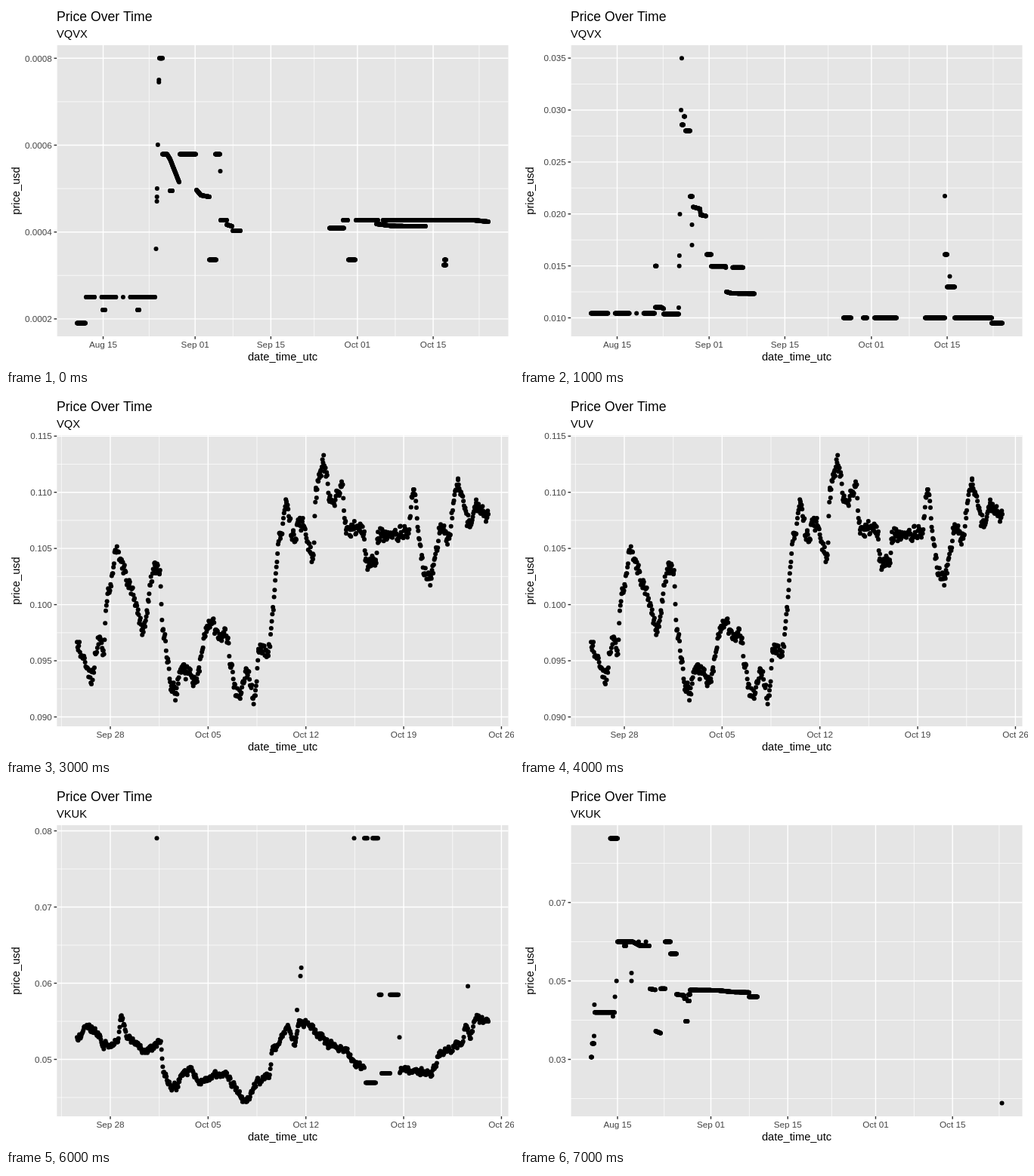
An HTML page with a canvas for the animation above (8 s loop, 672 px wide and 480 px high).

```html
<!DOCTYPE html>
<html lang="en">
<head>
<meta charset="utf-8">
<title>Price Over Time</title>
<style>
  html, body { margin: 0; width: 100%; height: 100%; overflow: hidden; background: #fff; }
  canvas { display: block; }
</style>
</head>
<body>
<canvas id="stage" width="672" height="480"></canvas>
<script>
const ctx = document.getElementById('stage').getContext('2d');
const PANEL = { left: 67.2, top: 52, right: 664.7, bottom: 438 };
const RADIUS = 3;
const FONT = '"Liberation Sans", Arial, sans-serif';

const monthAxis = (start, day) => ({
  day,
  labels: ['Aug 15', 'Sep 01', 'Sep 15', 'Oct 01', 'Oct 15'],
  at: [0, 17, 31, 47, 61].map(d => start + d * day)
});
const weekAxis = {
  day: 18.48,
  labels: ['Sep 28', 'Oct 05', 'Oct 12', 'Oct 19', 'Oct 26'],
  at: [0, 1, 2, 3, 4].map(i => 138 + i * 129.35)
};
const valueAxis = (first, step, count, digits, y, gap) => ({
  labels: Array.from({ length: count }, (_, i) => (first - i * step).toFixed(digits)),
  at: Array.from({ length: count }, (_, i) => y + i * gap)
});

let random, hour;

function seeded(seed) {
  return () => (seed = (seed * 16807) % 2147483647) / 2147483647;
}

function dot(x, y) {
  ctx.beginPath();
  ctx.arc(x, y, RADIUS, 0, Math.PI * 2);
  ctx.fill();
}

// Calls visit(x, y) once an hour along a polyline of x, y pairs.
function hourly(keys, ease, visit) {
  for (let i = 0; i + 3 < keys.length; i += 2) {
    const [x0, y0, x1, y1] = keys.slice(i, i + 4);
    const count = Math.max(1, Math.round((x1 - x0) / hour));
    for (let k = 0; k <= count; k++) {
      const t = k / count;
      visit(x0 + (x1 - x0) * t, y0 + (y1 - y0) * ease(t));
    }
  }
}

const slope = (...keys) => hourly(keys, t => t, dot);

// A constant price, with a pause of about a day now and then.
function level(y, x0, x1, pauses = 0) {
  let resume = x0;
  hourly([x0, y, x1, y], t => t, x => {
    if (x < resume) return;
    dot(x, y);
    if (random() < pauses) resume = x + hour * (22 + 10 * random());
  });
}

// A wandering price: smooth moves between keys plus correlated noise.
function walk(spread, ...keys) {
  let drift = 0;
  hourly(keys, t => t * t * (3 - 2 * t), (x, y) => {
    drift = drift * 0.45 + (random() + random() - 1) * spread;
    dot(x, y + drift);
  });
}

// Single trades during a steep rise, leaning slightly to the right.
const rise = (x, lean, ...ys) => ys.forEach(y => dot(x + (ys[0] - y) * lean, y));

const charts = [
  {
    x: monthAxis(128.5, 7.157),
    y: valueAxis(0.0008, 0.0002, 4, 4, 69.3, 115.2),
    plot() {
      level(420.5, 94, 105);
      level(386, 106, 197, 0.012);
      level(403, 128, 131);
      level(403, 174, 176);
      rise(198.5, 0.017, 322, 259, 253, 242, 184, 101, 98);
      level(69.3, 203, 207);
      slope(207, 196.5, 213, 196.5, 217, 203, 229, 233.5);
      level(245, 217, 220);
      level(196.5, 230, 251);
      slope(252, 244, 258, 251, 269, 253);
      level(336.5, 269, 278);
      level(196.5, 277, 283);
      dot(283.5, 219);
      level(284, 284, 292);
      slope(292, 290, 299, 292);
      level(298, 300, 310);
      level(294.5, 428, 447);
      level(284, 446, 452);
      level(336.5, 453, 462);
      level(284, 463, 525, 0.012);
      slope(525, 284, 619, 284, 638, 286);
      slope(490, 289, 510, 291.5, 530, 292);
      level(292, 530, 555, 0.02);
      level(336.5, 580, 582);
      level(343.5, 579, 582);
    }
  },
  {
    x: monthAxis(128.5, 7.157),
    y: valueAxis(0.035, 0.005, 6, 3, 69.1, 68.88),
    plot() {
      level(407.5, 94, 178, 0.02);
      slope(179, 399.5, 187, 399.5, 190, 401.5);
      level(408.5, 190, 210);
      level(344.7, 179, 180.5);
      rise(210, 0.012, 400, 344.7, 331, 276, 138, 69.3);
      level(157.5, 214, 216);
      level(146.5, 217, 218);
      level(165.5, 219, 225);
      level(252.5, 225, 228);
      rise(227.5, 0, 317, 290);
      slope(229, 266.5, 238, 269, 239, 277, 246, 278.5);
      level(329.5, 247, 253);
      level(345.3, 253, 272);
      level(346.7, 272, 295, 0.03);
      slope(273, 379, 280, 381, 310, 381.5);
      level(413.5, 428, 438);
      level(413.5, 454, 459);
      level(413.5, 469, 498);
      level(413.5, 536, 562);
      dot(562, 252);
      level(329.5, 562, 565);
      level(372.5, 565, 575);
      dot(568.5, 358.5);
      level(413.5, 575, 624);
      level(420.5, 624, 638);
    }
  },
  {
    x: weekAxis,
    y: valueAxis(0.115, 0.005, 6, 3, 53.2, 74.47),
    plot() {
      walk(13,
        94, 330, 113, 370, 124, 315, 128, 345, 136, 255, 146, 208, 163, 248, 181, 310,
        197, 225, 203, 235, 208, 315, 221, 392, 237, 362, 250, 380, 269, 304, 290, 315,
        306, 398, 319, 371, 330, 405, 334, 337, 347, 340, 363, 180, 371, 146, 380, 193,
        388, 163, 406, 215, 410, 128, 421, 86, 428, 138, 444, 124, 450, 175, 474, 180,
        476, 222, 489, 222, 492, 184, 531, 181, 539, 126, 554, 238, 562, 238, 575, 175,
        584, 186, 598, 112, 613, 168, 622, 143, 638, 160);
    }
  },
  {
    x: weekAxis,
    y: valueAxis(0.08, 0.01, 4, 2, 59.5, 101),
    plot() {
      walk(6,
        94, 335, 107, 318, 124, 328, 127, 346, 148, 340, 152, 306, 160, 332, 184, 352,
        204, 340, 209, 382, 220, 400, 243, 376, 257, 394, 286, 380, 319, 418, 332, 394,
        348, 384, 353, 350, 372, 321, 383, 344, 387, 312, 437, 345, 474, 374);
      level(393.5, 476, 489);
      level(381, 497, 508);
      walk(6, 521, 376, 562, 380, 577, 352, 603, 342, 608, 318, 614, 330, 622, 308, 638, 310);
      dot(199.5, 69.3);
      dot(460.5, 69.3);
      level(69.3, 474, 478);
      level(69.3, 485, 492);
      level(276.7, 493.5, 496.5);
      level(276.7, 508, 519, 0.1);
      dot(520.5, 333.3);
      rise(385, 0.1, 297, 252, 241);
      dot(611, 265.5);
    }
  },
  {
    x: monthAxis(129, 7.265),
    y: valueAxis(0.07, 0.02, 3, 2, 154.5, 104),
    plot() {
      level(359.5, 94, 95);
      level(341.5, 95.5, 98);
      rise(98, 0.01, 331.5, 290);
      level(300.2, 99, 125);
      rise(123, 0.1, 305.5, 279.5, 258.5);
      level(69.5, 119.5, 129, 0.02);
      slope(129, 206.5, 149, 206.5, 158, 211.5, 171, 212);
      level(212, 138, 140);
      level(206.5, 157, 172, 0.05);
      rise(147.5, 0, 258.5, 248);
      slope(172, 269, 179, 270.3);
      slope(179.5, 325, 186, 327.7);
      level(268.7, 186, 192);
      level(206.5, 192, 199);
      level(222.5, 199, 207);
      slope(207, 276.3, 217, 277.7);
      level(282, 217.5, 220);
      level(312, 219, 221.5);
      level(285, 222, 224);
      level(276.5, 223, 225);
      slope(225, 270.5, 262, 271, 280, 273, 303, 273.8);
      level(279.5, 303, 314);
      dot(637.5, 420.5);
    }
  }
];
const tickers = ['VQVX', 'VQX', 'VUV', 'VKUK'];

function line(x0, y0, x1, y1) {
  ctx.beginPath();
  ctx.moveTo(x0, y0);
  ctx.lineTo(x1, y1);
  ctx.stroke();
}

function text(str, x, y, size, color = '#000', align = 'left') {
  ctx.font = `${size}px ${FONT}`;
  ctx.fillStyle = color;
  ctx.textAlign = align;
  ctx.fillText(str, x, y);
}

// Midpoints between the breaks, carried half a step past both ends.
function minorBreaks(at) {
  const half = (at[1] - at[0]) / 2;
  return [at[0] - half, ...at.slice(1).map((v, i) => (v + at[i]) / 2), at[at.length - 1] + half];
}

function drawGrid({ x, y }) {
  const { left, top, right, bottom } = PANEL;
  const rules = (xs, ys, width) => {
    ctx.lineWidth = width;
    ys.forEach(v => line(left, v, right, v));
    xs.forEach(v => line(v, top, v, bottom));
  };
  ctx.save();
  ctx.beginPath();
  ctx.rect(left, top, right - left, bottom - top);
  ctx.clip();
  ctx.fillStyle = '#e5e5e5';
  ctx.fillRect(left, top, right - left, bottom - top);
  ctx.strokeStyle = '#fff';
  rules(minorBreaks(x.at), minorBreaks(y.at), 0.71);
  rules(x.at, y.at, 1.42);
  ctx.restore();
}

function drawAxes({ x, y }) {
  const { left, bottom } = PANEL;
  ctx.strokeStyle = '#333';
  ctx.lineWidth = 1.42;
  x.at.forEach((v, i) => {
    line(v, bottom, v, bottom + 3.7);
    text(x.labels[i], v, 453, 11.73, '#444', 'center');
  });
  y.at.forEach((v, i) => {
    line(left - 3.7, v, left, v);
    text(y.labels[i], 60.8, v + 4.2, 11.73, '#444', 'right');
  });
}

function draw(chart, ticker) {
  ctx.fillStyle = '#fff';
  ctx.fillRect(0, 0, 672, 480);
  drawGrid(chart);

  random = seeded(4711);
  hour = chart.x.day / 24;
  ctx.fillStyle = '#000';
  chart.plot();

  drawAxes(chart);
  text('Price Over Time', 67, 20, 17.6);
  text(ticker, 67, 42, 14.67);
  text('date_time_utc', 366, 470, 14.67, '#000', 'center');
  ctx.save();
  ctx.translate(18, 245);
  ctx.rotate(-Math.PI / 2);
  text('price_usd', 0, 0, 14.67, '#000', 'center');
  ctx.restore();
}

// The chart and its subtitle take turns changing, one second apart.
let shown = -1;
function tick() {
  const step = Math.floor((performance.now() % 8000) / 1000);
  if (step !== shown) {
    shown = step;
    draw(charts[Math.ceil(step / 2)], tickers[Math.floor(step / 2)]);
  }
  requestAnimationFrame(tick);
}
tick();
</script>
</body>
</html>
```
